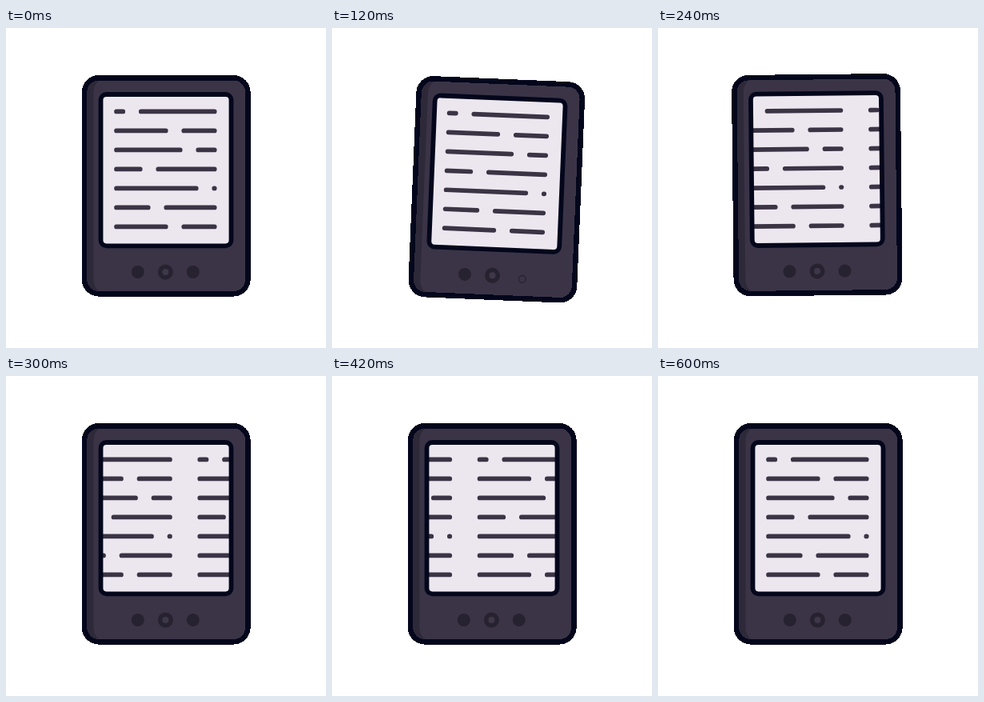
An HTML page that plays this animation: 400 px wide and 400 px high, repeating every 2660 ms.

```html
<!DOCTYPE html>
<html lang="en">
<head>
<meta charset="utf-8">
<title>E-reader page turn</title>
<style>
  html, body { margin: 0; width: 100%; height: 100%; overflow: hidden; background: #fff; }
  svg { display: block; width: 100%; height: 100%; }
</style>
</head>
<body>
<svg viewBox="0 0 400 400">
  <defs>
    <clipPath id="screen"><rect x="119.5" y="84" width="161" height="187" rx="6"/></clipPath>
    <clipPath id="shell"><rect x="98" y="62.3" width="204.4" height="270" rx="18"/></clipPath>
    <path id="page" fill="none" stroke="#3b3445" stroke-width="5.7" stroke-linecap="round"/>
  </defs>
  <g id="device">
    <g clip-path="url(#shell)">
      <rect x="98" y="62" width="205" height="271" fill="#2e2939"/>
      <rect x="109.5" y="62" width="210" height="271" rx="18" fill="#3b3447"/>
    </g>
    <rect x="98" y="62.3" width="204.4" height="270" rx="18" fill="none"
      stroke="#04071c" stroke-width="6.5" shape-rendering="crispEdges"/>
    <rect x="118.5" y="83" width="163" height="189.3" rx="7" fill="#ece7ef"/>
    <g clip-path="url(#screen)">
      <g id="text">
        <use href="#page"/>
        <use href="#page" x="160"/>
      </g>
    </g>
    <rect x="118.5" y="83" width="163" height="189.3" rx="7" fill="none" stroke="#04071c" stroke-width="5.8"/>
    <g fill="#27222f">
      <circle cx="164.8" cy="305" r="8"/>
      <circle cx="199.4" cy="305" r="9.5"/>
      <circle cx="199.4" cy="305" r="4" fill="#3e374a"/>
      <circle id="button" cx="233.8" cy="305" r="8"/>
    </g>
  </g>
</svg>
<script>
  const LOOP = 2660, STEP = 30, MOTION_END = 600;
  const $ = id => document.getElementById(id);

  // Each row is split in two by a gap after the given x.
  const splits = [149, 202.5, 220.5, 170.5, 240.5, 180.5, 202.5];
  $("page").setAttribute("d", splits.map((x, i) => {
    const y = 104.4 + 24 * i;
    return `M138 ${y}H${x - 2.75}M${x + 19.75} ${y}H260.7`;
  }).join(""));

  const ease = (t, from, to) => {
    const p = Math.min(1, Math.max(0, (t - from) / (to - from)));
    return (1 - Math.cos(Math.PI * p)) / 2;
  };

  function draw(t) {
    const tilt = 2.7 * ease(t, 0, 100) - 3.7 * ease(t, 100, 205) + ease(t, 205, 285);
    $("device").setAttribute("transform", `rotate(${tilt} 95 335)`);
    $("text").setAttribute("transform", `translate(${-160 * ease(t, 95, 605)})`);

    // The right button shrinks towards its lower right corner.
    const press = ease(t, 0, 90) - ease(t, 120, 180);
    const hollow = t > 45 && t < 165;
    const button = $("button");
    button.setAttribute("transform", `translate(${3 * press} ${3 * press})`);
    button.setAttribute("r", 8 - 3.6 * press);
    button.setAttribute("fill", hollow ? "#3b3447" : "#27222f");
    button.setAttribute("stroke", hollow ? "#27222f" : "none");
    button.setAttribute("stroke-width", 1.3);
  }

  const start = performance.now();
  function tick() {
    const t = (performance.now() - start) % LOOP;
    draw(Math.min(MOTION_END, Math.floor(t / STEP) * STEP));
    requestAnimationFrame(tick);
  }
  tick();
</script>
</body>
</html>
```
